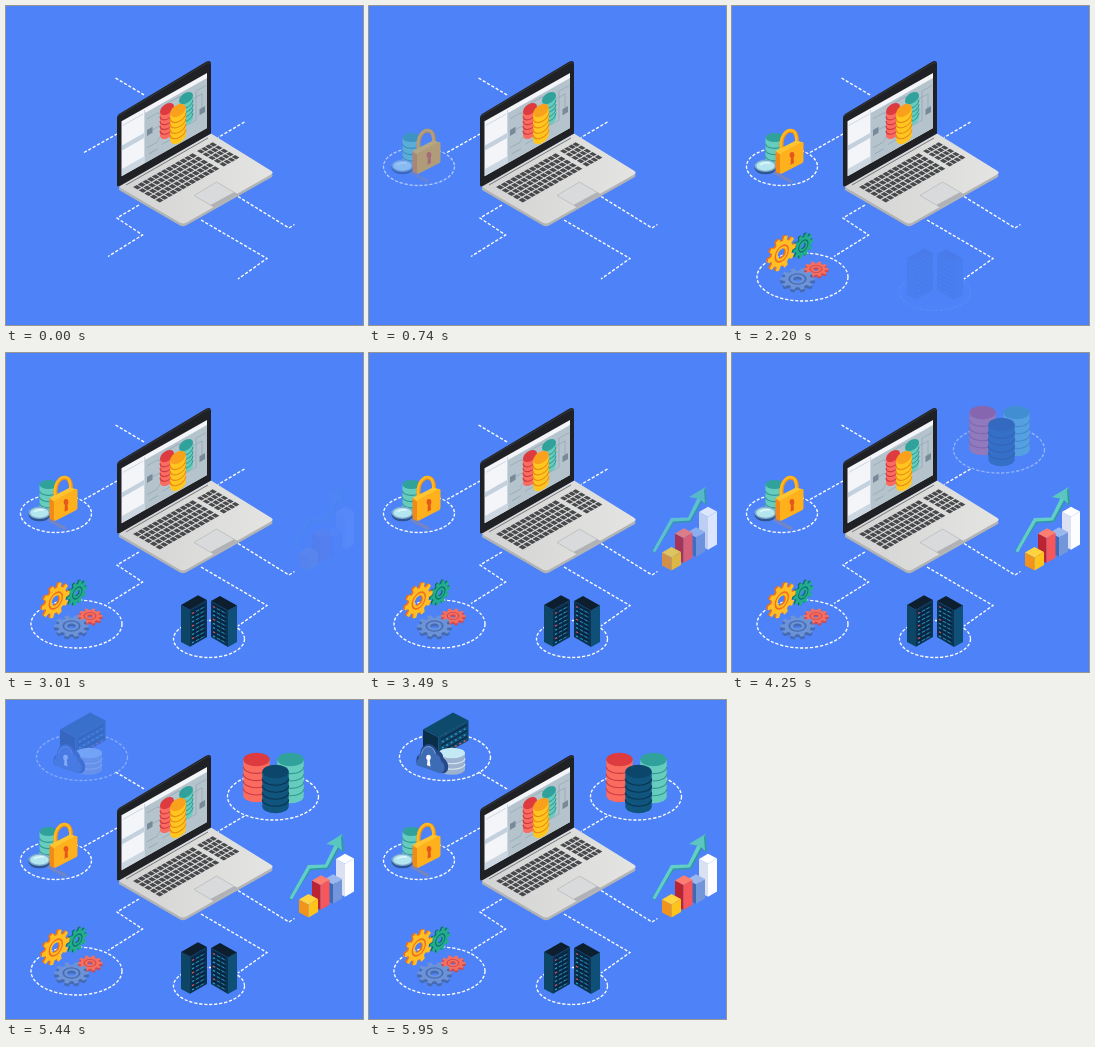
Recreate the animation shown at these times as an HTML page. Size 357x319 px, loop 8000 ms.

```html
<!DOCTYPE html>
<html lang="en">
<head>
<meta charset="utf-8">
<title>Data services</title>
<style>
html, body { margin: 0; width: 100%; height: 100%; overflow: hidden; background: #4d82f8; }
svg { display: block; width: 100vw; height: 100vh; }
.dash { fill: none; stroke: #fff; stroke-width: 1.35; stroke-dasharray: 3.2 1.8; }
.item { animation: 8s infinite; }
#lock { animation-name: lock; }
#gears { animation-name: gears; }
#racks { animation-name: racks; }
#chart { animation-name: chart; }
#disks { animation-name: disks; }
#cloud { animation-name: cloud; }
/* each item appears in small opacity steps */
@keyframes lock {
  0%, 6.625% { opacity: 0; animation-timing-function: steps(14, start); }
  11.875%, 100% { opacity: 1; }
}
@keyframes gears {
  0%, 15.625% { opacity: 0; animation-timing-function: steps(16, start); }
  21.625%, 100% { opacity: 1; }
}
@keyframes racks {
  0%, 27.5% { opacity: 0; animation-timing-function: steps(17, start); }
  33.875%, 100% { opacity: 1; }
}
@keyframes chart {
  0%, 37.625% { opacity: 0; animation-timing-function: steps(21, start); }
  45.5%, 100% { opacity: 1; }
}
@keyframes disks {
  0%, 50.125% { opacity: 0; animation-timing-function: steps(23, start); }
  58.75%, 100% { opacity: 1; }
}
@keyframes cloud {
  0%, 65.375% { opacity: 0; animation-timing-function: steps(25, start); }
  74.75%, 100% { opacity: 1; }
}
</style>
</head>
<body>
<svg viewBox="0 0 357 319" preserveAspectRatio="none">
  <defs>
    <linearGradient id="deck" x1="0" x2="1">
      <stop offset="0" stop-color="#d3d3d3"/><stop offset="1" stop-color="#e4e4e2"/>
    </linearGradient>
  </defs>

  <g class="dash">
    <path d="M109.500 72L139 89.500M78 146.500L111 128M238.500 116L212 131.500"/>
    <path d="M133 199L111 212L136.500 229L102 250.500"/>
    <path d="M195 214L261 252.500L232 273"/>
    <path d="M232 190.500L283 222L288.500 218.500"/>
  </g>

  <g id="laptop">
    <path d="M113 182L205 130L266 168.500Q267.500 170 265 171.500L180 219.500Q177 221 174 219.500L113 184Z" fill="#b2b3b4"/>
    <path d="M112 180.500L205 127.500L265.500 165Q268 167 265 168.500L180 216.800Q177 218.300 174 216.800Z" fill="url(#deck)"/>
    <path d="M111 112Q111 109.500 113 108L200.500 55.500Q205 53.500 205 58V127.500L113 180.500Q111 181 111 179Z" fill="#202124"/>
    <path d="M112 110L201 57Q203 56 204 57.500" fill="none" stroke="#3b3d41" stroke-width=".8"/>
    <path d="M120 179L202 132" stroke="#77797c" stroke-width="1"/>
    <g id="screen"></g>
    <g id="keys" fill="none" stroke="#48494c" stroke-width=".78"></g>
    <path d="M188 189.500L210.500 176L232 188.500L208.500 201.500Z" fill="#d9dadb" stroke="#b4b6b8" stroke-width=".7"/>
    <path d="M204.500 199L228 186.300L232 188.500L208.500 201.500Z" fill="#b0b2b5"/>
  </g>

  <g id="lock" class="item"></g>
  <g id="gears" class="item"></g>
  <g id="racks" class="item"></g>
  <g id="chart" class="item"></g>
  <g id="disks" class="item"></g>
  <g id="cloud" class="item"></g>
</svg>
<script>
const put = (id, ...parts) => document.getElementById(id).innerHTML = parts.join('');
const group = (transform, ...parts) => `<g transform="${transform}">${parts.join('')}</g>`;
const path = (d, fill, more = '') => `<path d="${d}" fill="${fill}" ${more}/>`;
const line = (d, color, w, more = '') => path(d, 'none', `stroke="${color}" stroke-width="${w}" ${more}`);
const rect = (x, y, w, h, fill) => `<rect x="${x}" y="${y}" width="${w}" height="${h}" fill="${fill}"/>`;
const oval = (x, y, rx, ry, more) => `<ellipse cx="${x}" cy="${y}" rx="${rx}" ry="${ry}" ${more}/>`;
const ring = (x, y, rx, ry) => oval(x, y, rx, ry, 'class="dash"');
const fill = c => `fill="${c}"`;

// Stack of discs; y is the centre of the lid
function drum(x, y, rx, ry, h, n, [lid, side, gap]) {
  const arc = `a${rx} ${ry} 0 0 0 ${2 * rx} 0`;
  let s = path(`M${x - rx} ${y}v${h}${arc}v${-h}z`, side);
  for (let i = 1; i < n; i++) s += line(`M${x - rx} ${y + h * i / n}${arc}`, gap, 1.1);
  return s + oval(x, y, rx, ry, fill(lid));
}
const lean = (x, y, ...rest) => group(`translate(${x} ${y}) skewY(-20)`, drum(0, 0, ...rest));

// Upright box from the top-left corner, faces left and right
function box(x, y, lw, rw, h, [top, left, right]) {
  const a = lw * .52, b = rw * .57;
  return path(`M${x} ${y}l${lw} ${a}v${h}l${-lw} ${-a}z`, left) +
    path(`M${x + lw} ${y + a}l${rw} ${-b}v${h}l${-rw} ${b}z`, right) +
    path(`M${x} ${y}l${rw} ${-b}l${lw} ${a}l${-rw} ${b}z`, top);
}

function cog(r, n, hole) {
  const pts = [];
  for (let i = 0; i < n; i++) {
    [[-.32, .76], [-.2, 1], [.2, 1], [.32, .76]].forEach(([o, k]) => {
      const a = (i + o) * 2 * Math.PI / n;
      pts.push((r * k * Math.cos(a)).toFixed(2) + ' ' + (r * k * Math.sin(a)).toFixed(2));
    });
  }
  return `M${pts.join('L')}ZM${-hole} 0a${hole} ${hole} 0 1 0 ${2 * hole} 0a${hole} ${hole} 0 1 0 ${-2 * hole} 0z`;
}

function gear(x, y, plane, r, n, hole, [face, edge], dx, dy) {
  const one = (px, py, c, more = '') => group(`matrix(${plane} ${px} ${py})`,
    path(cog(r, n, hole), c, 'fill-rule="evenodd"'), more);
  const groove = `<circle r="${r * .47}" fill="none" stroke="${edge}" stroke-width="${r * .1}"/>`;
  return one(x + dx, y + dy, edge) + one(x + dx / 2, y + dy / 2, edge) + one(x, y, face, groove);
}

const RED = ['#dd3b3f', '#fb6c60', '#cb3a43'];
const TEAL = ['#30a29b', '#66cdbe', '#339792'];
const GOLD = ['#f9a01c', '#ffc61f', '#ea8a17'];
const NAVY = ['#0c476b', '#0f557d', '#0a3250'];
const PALE = ['#c3eaf4', '#9db2cf', '#d7e6f0'];

put('screen',
  group('matrix(1 -.565 0 1 116 115)',
    rect(-.5, 0, 85.5, 55, '#f3f5f8'),
    rect(23, 5, 62, 50, '#b4c3cc'),
    rect(0, 24.500, 22, 5, '#c3d0dd'), rect(0, 48, 22, 7, '#ccd7e2'),
    line('M1 5H21M22.500 2V55', '#c3cedb', .8),
    line('M25 12H36L40 17V35L35 41H25M29 26H38M40 46H58L63 41H74V12H84M70 18H80V33M45 8H57L61 12M27 48H36', '#94a8b5', .8),
    rect(25, 23, 5.5, 6, '#788a99'), rect(77.5, 32, 5.5, 6, '#788a99')),
  lean(180, 92, 7, 5.5, 22, 5, TEAL),
  lean(161, 103, 7, 5.5, 24, 5, RED),
  lean(172, 104.500, 7.8, 6, 27, 5, GOLD));

const keys = (x, y, cols, w) => {
  let s = '';
  for (let i = 0; i < 5; i++) s += `<path d="M.1 ${i + .5}H${cols}" stroke-dasharray=".8 .2"/>`;
  return group(`matrix(${w} ${-w * .567} 5.6 3.2 ${x} ${y})`, s);
};
put('keys', keys(126, 181, 13, 4.65), keys(190, 145, 4, 4.1));

put('lock',
  ring(50, 160.500, 35.5, 19),
  drum(42.5, 131.500, 9, 4.6, 25, 4, TEAL),
  line('M43 167L59 175.500', '#7385c4', 3.2, 'stroke-linecap="round"'),
  oval(33.5, 162, 11, 6.3, fill('#2f5590')),
  oval(33.5, 159.800, 11, 6.2, fill('#7fa9cf')),
  oval(33.5, 159.800, 9.2, 4.9, fill('#b3e6ee')),
  line('M28 159Q32 156 38 157', '#e2f8fb', 1.3),
  line('M49.500 146V137Q50.500 128 56.500 125Q64 123 65 133V140', '#f08f16', 4),
  line('M49 146V136.500Q50 127.500 56 124.500Q63.500 122.500 64.300 132V140', '#ffb81f', 2.6),
  path('M43.500 145L48 147.500V168L45 166.500Q43.500 165.500 43.500 164Z', '#f28a17'),
  path('M43.500 145L64 134.500L71.500 136.500L48 148.500Z', '#ffc531'),
  path('M48 149Q48 147.500 49.500 146.700L69.500 136Q71.500 135.500 71.500 137.500V154.500Q71.500 156.500 70 157.300L50 167.500Q48 168.500 48 166.500Z', '#feb11c'),
  oval(60, 149, 2.4, 2.9, fill('#e5581c')),
  path('M59 150L61.300 149L62 157L58.500 158.700Z', '#e5581c'));

const WALL = '.87 -.5 0 1', FLOOR = '1 0 0 .62';
put('gears',
  ring(70.5, 271, 45.5, 24),
  gear(71.3, 240, WALL, 11.5, 10, 2.8, ['#22ae8c', '#116c70'], -1.300, -.6),
  gear(49.8, 247.500, WALL, 16, 10, 4.6, ['#ffbe24', '#ee6f20'], -1.600, -.7),
  gear(84, 263, FLOOR, 12.5, 10, 2.8, ['#f56f61', '#d04a4e'], 0, 2),
  gear(65.5, 273, FLOOR, 17.5, 10, 4.2, ['#6c92d8', '#456bb2'], 0, 2.8));

// drive slots on a rack front; k is the slope of the rows
const slots = (x, y, k) => {
  let s = '';
  for (let i = 0; i < 8; i++) {
    const t = y + i * 4.2;
    s += line(`M${x} ${t}l13 ${k * 13}`, '#06213a', 1.2) +
      line(`M${x} ${t + 2}l2 ${k * 2}`, i % 3 ? '#2f9bcb' : '#e5505a', 1.2) +
      line(`M${x + 4} ${t + 2 + k * 4}l9 ${k * 9}`, '#2989b8', 1, 'stroke-dasharray="3.500 1.500"');
  }
  return s;
};
put('racks',
  ring(203, 286, 35.5, 18.5),
  box(175, 252, 9, 17, 37, ['#0d1f2e', '#0d4567', '#0b3452']),
  slots(186, 258.500, -.53),
  path('M205 248L222 257.500V294L205 284Z', '#0b3452'),
  path('M222 257.500L231 252.500V289L222 294Z', '#0f5078'),
  path('M205 248L214 243L231 252.500L222 257.500Z', '#0d1f2e'),
  slots(207, 251.500, .53));

put('chart',
  path('M284.500 201L283.500 197L302.500 165.500L319.500 165L330 145L334 147L322 169L305 170Z', '#2f9a9f'),
  path('M283.500 198L302 165L319 164.500L329 144L332.500 146L321 167.500L304 168.500L286 199.500Z', '#62cfc6'),
  path('M320 144L336.500 134L337.500 152L332.500 147.500L328 145.500Z', '#5ac6bf'),
  path('M336.500 134L338 152L336 151L335 137Z', '#2f9a9f'),
  box(330, 159, 9, 9, 33, ['#fff', '#d9e1f3', '#fdfdff']),
  box(318, 179.500, 9, 9, 19.5, ['#9bb8ee', '#3f69b6', '#7395da']),
  box(306, 180.500, 8.5, 9, 25, ['#ff7e70', '#bb2432', '#f5575a']),
  box(293, 199.500, 9.5, 9.5, 13, ['#ffd43f', '#f2931b', '#ffc41c']));

put('disks',
  ring(267, 96.500, 45.5, 23.5),
  drum(250.5, 59.500, 13.2, 6.7, 36, 5, RED),
  drum(284.5, 59.500, 13.2, 6.7, 37, 5, TEAL),
  drum(269.5, 71.500, 13.2, 6.7, 35, 5, NAVY));

const drives = [0, 1, 2].map(i =>
  line(`M72 ${39.5 + i * 6}L98 ${24.7 + i * 6}`, '#06213a', 1) +
  line(`M73 ${42 + i * 6}L97 ${28.3 + i * 6}`, i < 2 ? '#2f94c0' : '#d9545c', 1.6, 'stroke-dasharray="2 3"')).join('');
put('cloud',
  ring(76, 57, 45.5, 23.5),
  box(54, 29.500, 15.5, 30, 20, ['#0d4a6c', '#0a2d48', '#10486b']),
  drives,
  drum(83, 53, 13, 5.2, 16.5, 3, PALE),
  path('M48 65Q45.500 57 51 54Q52 45 59 44Q65 44 68 50.500Q73.500 51 74.500 58Q80 62 79 69Q78 74 72 73Z', '#24488a'),
  path('M48 65Q46 61 50 58.500Q48.500 55 52.500 53Q54 46 60 46Q65.500 47 66.500 54Q71 54.500 72 61Q77 65 75 70Q74 74 69 72.500Z', '#3d6bb4'),
  line('M52.500 53.500Q54 46.500 60 46.500Q65 47.500 66.500 54', '#7a9fd6', 1),
  oval(59.5, 57.500, 2.3, 2.8, fill('#f5f9ff')),
  path('M58.500 58.500H60.600L61.500 66.500L58 65.300Z', '#f5f9ff'));
</script>
</body>
</html>
```
